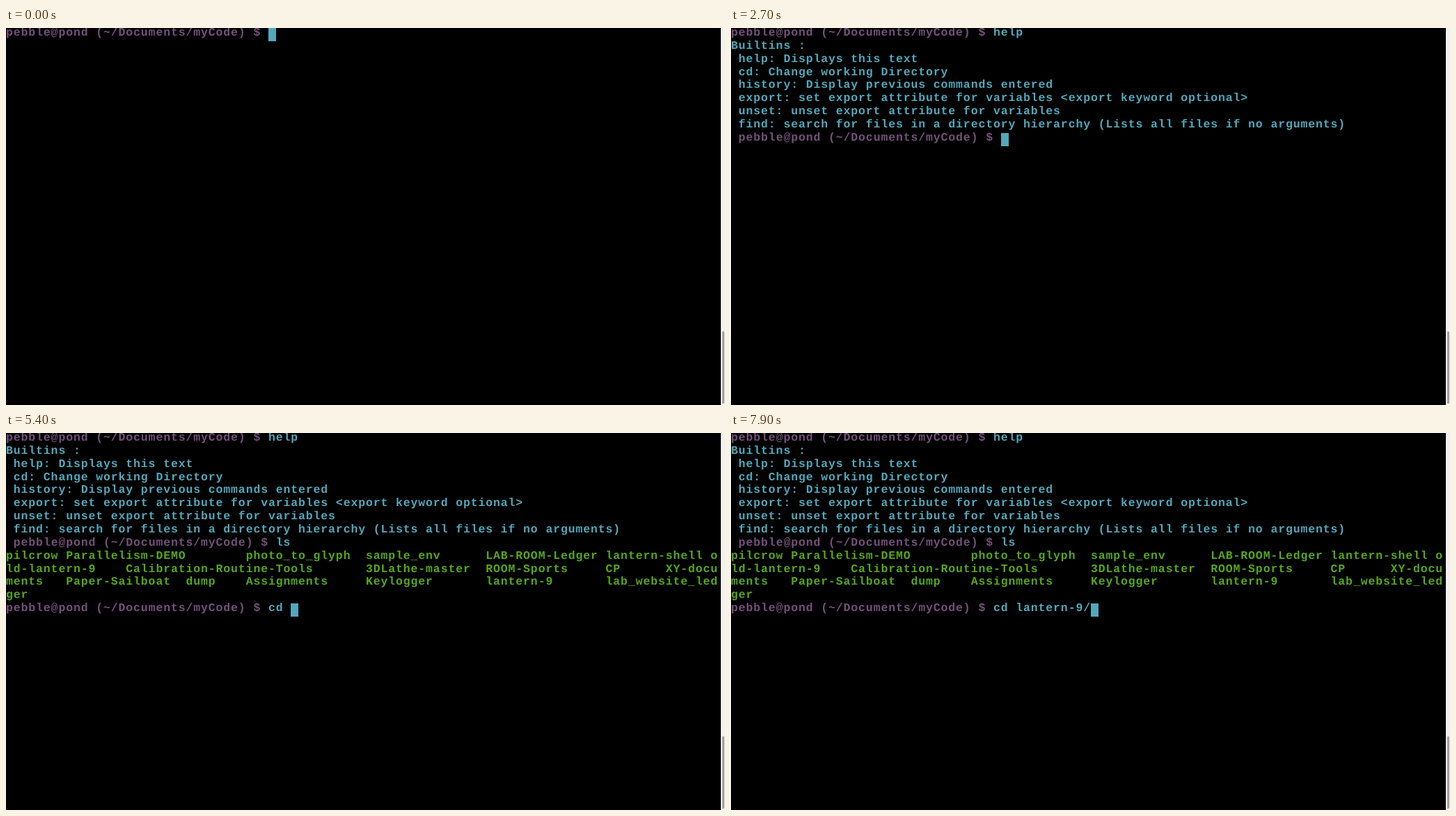
Recreate the animation shown at these times as an HTML page. Size 1033x542 px, loop 8 s.

```html
<!DOCTYPE html>
<html lang="en">
<head>
<meta charset="utf-8">
<title>Shell session</title>
<style>
  html, body { margin: 0; width: 100%; height: 100%; overflow: hidden; background: #000; }
  #stage { position: relative; width: 100%; height: 100%; overflow: hidden; contain: strict; }
  #screen div {
    position: absolute; left: 0; white-space: pre;
    font: bold 16.5px/18.85px "Liberation Mono", monospace; letter-spacing: 0.868px;
    text-rendering: geometricPrecision; color: #53a8bb;
  }
  #screen .prompt { color: #75507b; }
  #screen .files { color: #56a81a; }
  #cursor { position: absolute; width: 10.8px; height: 18.85px; background: #53a8bb; }
  #track { position: absolute; left: 1027px; top: 0; width: 6px; height: 542px; background: #f2f1f0; }
  #thumb { position: absolute; left: 2px; top: 436px; width: 3px; height: 104px; border-radius: 2px; background: #a19f9c; }
</style>
</head>
<body>
<div id="stage">
  <div id="screen"></div>
  <div id="cursor"></div>
  <div id="track"><div id="thumb"></div></div>
</div>
<script>
const CELL = 10.77, ROW = 18.85, LOOP = 8000, TAB = 8;
const PROMPT = 'pebble@pond (~/Documents/myCode) $ ';
const prompt = `<span class="prompt">${PROMPT}</span>`;
const screen = document.getElementById('screen');
const cursor = document.getElementById('cursor');

const help = [
  'Builtins :',
  ' help: Displays this text',
  ' cd: Change working Directory',
  ' history: Display previous commands entered',
  ' export: set export attribute for variables &lt;export keyword optional&gt;',
  ' unset: unset export attribute for variables',
  ' find: search for files in a directory hierarchy (Lists all files if no arguments)'
];

// Pads a name with spaces up to the next tab stop
const toTabStop = name => name.padEnd(Math.ceil((name.length + 1) / TAB) * TAB);
const files = [
  'pilcrow\tParallelism-DEMO\tphoto_to_glyph\tsample_env\tLAB-ROOM-Ledger\tlantern-shell o',
  'ld-lantern-9\tCalibration-Routine-Tools\t3DLathe-master\tROOM-Sports\tCP\tXY-docu',
  'ments\tPaper-Sailboat\tdump\tAssignments\tKeylogger\tlantern-9\tlab_website_led',
  'ger'
].map(line => `<span class="files">${line.split('\t').map(toTabStop).join('').trimEnd()}</span>`);

// Lines already printed, and the indent of the prompt that follows them
const afterHelp = [prompt + 'help', ...help];
const stages = [
  { lines: [], indent: '' },
  { lines: afterHelp, indent: ' ' },
  { lines: [...afterHelp, ' ' + prompt + 'ls', ...files], indent: '' }
];

// [start ms, stage, typed text, cursor visible]
const steps = [
  [0, 0, '', 1], [200, 0, '', 0], [800, 0, '', 1], [1400, 0, '', 0], [1800, 0, '', 1],
  [2000, 0, 'he', 1], [2200, 0, 'hel', 1], [2300, 0, 'help', 1],
  [2700, 1, '', 1], [3300, 1, '', 0], [3500, 1, 'ls', 1],
  [4100, 2, '', 1], [4600, 2, '', 0], [5100, 2, 'c', 1], [5200, 2, 'cd', 1],
  [5400, 2, 'cd ', 1], [5800, 2, 'cd l', 1], [6000, 2, 'cd lan', 1], [6600, 2, 'cd lan', 0],
  [6900, 2, 'cd lan', 1], [7000, 2, 'cd lant', 1], [7500, 2, 'cd lant', 0],
  [7600, 2, 'cd lantern-', 1], [7800, 2, 'cd lantern-9', 1], [7900, 2, 'cd lantern-9/', 1]
];

function show([, stage, typed, visible]) {
  const { lines, indent } = stages[stage];
  screen.innerHTML = [...lines, indent + prompt + typed]
    .map((line, i) => `<div style="top:${i * ROW - 2}px">${line}</div>`).join('');
  cursor.style.left = (indent + PROMPT + typed).length * CELL + 'px';
  cursor.style.top = lines.length * ROW + 'px';
  cursor.style.visibility = visible ? 'visible' : 'hidden';
}

const start = performance.now();
let current;
function frame() {
  const time = (performance.now() - start) % LOOP;
  const step = steps.findLast(s => s[0] <= time);
  if (step !== current) show(current = step);
  requestAnimationFrame(frame);
}
frame();
</script>
</body>
</html>
```
